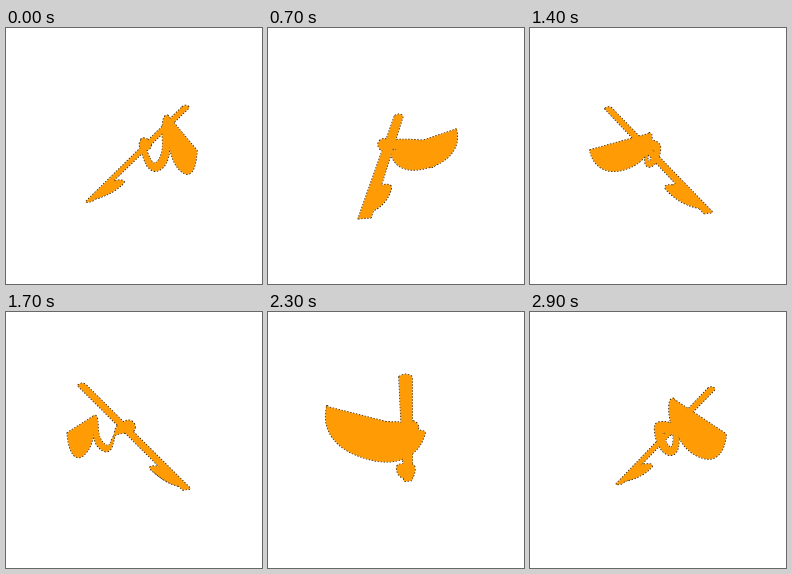
Recreate the animation shown at these times as an HTML page with a canvas. Size 256 by 256 pixels, loop 3000 ms.

```html
<!DOCTYPE html>
<html>
<head>
<meta charset="utf-8">
<style>
  html, body { margin: 0; width: 100%; height: 100%; overflow: hidden; background: #fff; }
  canvas { display: block; width: 256px; height: 256px; }
</style>
</head>
<body>
<canvas id="stage" width="256" height="256"></canvas>
<script>
const ctx = document.getElementById('stage').getContext('2d');
const STEPS = 30, STEP_MS = 100, DIST = 230, MID = 128;
const ORANGE = '#ff9b05';

// Points are [x, height, depth]; the model spins about the vertical axis.
const tip = [52, -49, 2], foot = [-49, 49, 20];
const mix = (a, b, k) => a.map((v, i) => v + (b[i] - v) * k);
const rod = h => mix(tip, foot, (h + 49) / 98);
const beside = (h, r, deg) => {
  const a = deg * Math.PI / 180, p = rod(h);
  return [p[0] + r * Math.cos(a), h, p[2] + r * Math.sin(a)];
};

// Rounded half disc hanging at right angles to the chord a-b
function bowl(a, b, depth) {
  const m = mix(a, b, 0.5), u = a.map((v, i) => v - m[i]);
  const lean = -u[1] * depth / (u[0] ** 2 + u[2] ** 2);
  const down = [u[0] * lean, depth, u[2] * lean];
  const full = v => Math.sign(v) * Math.abs(v) ** 0.88;
  return Array.from({ length: 33 }, (_, i) => {
    const t = Math.PI * i / 32, c = full(Math.cos(t)), s = full(Math.sin(t));
    return m.map((v, j) => v + u[j] * c + down[j] * s);
  });
}

const hornA = [25.1, -28.5, -62.5], hornB = [66.5, -5.8, 14.1];
const blade = bowl(hornA, hornB, 31);

// Ribbon from the rod, round below, and up to the blade
const hook = [
  [12, -17, 8], [9, -17, -15], [5.5, -14, -40], [6.5, -3, -41], [9, 4, -40],
  [12, 10, -36], [18, 13.5, -34], [24, 10, -40], [27, 2, -50], [27, -14, -60],
  [26, -30, -63], [21.5, -29, -62], [21, -18, -60], [23, -5, -50], [21, 4, -38],
  [18, 7, -31], [15, 5, -30], [13, 1, -32], [10, -6, -30], [9, -7, -15], [12, -7, 8]
];
const knob = [12, -12, 14];
const bit = deg => [
  rod(27), beside(26, 18, deg), beside(35, 18, deg), beside(43, 13, deg), rod(47), rod(38)
];
const curved = [hook, bit(-50), bit(15)];

function project([x, y, z], a) {
  const c = Math.cos(a), s = Math.sin(a);
  const k = DIST / (DIST + x * s + z * c);
  return [MID + (x * c - z * s) * k, MID + y * k, k];
}

function polygon(path, pts) {
  pts.forEach(([x, y], i) => i ? path.lineTo(x, y) : path.moveTo(x, y));
  path.closePath();
}

function smooth(path, pts) {
  const n = pts.length;
  const half = i => mix(pts[i % n], pts[(i + 1) % n], 0.5);
  path.moveTo(...half(n - 1).slice(0, 2));
  for (let i = 0; i < n; i++) {
    const h = half(i);
    path.quadraticCurveTo(pts[i][0], pts[i][1], h[0], h[1]);
  }
  path.closePath();
}

function shapes(a) {
  const list = [];
  const add = build => { const p = new Path2D(); build(p); list.push(p); };
  const view = pts => pts.map(p => project(p, a));

  add(p => polygon(p, view(blade)));
  curved.forEach(pts => add(p => smooth(p, view(pts))));

  const [kx, ky, ks] = project(knob, a);
  add(p => p.arc(kx, ky, 6 * ks, 0, 7));

  const [t, f] = view([tip, foot]);
  const w = Math.hypot(3.5 * Math.cos(a), 4.9 * Math.sin(a));
  add(p => {
    p.moveTo(t[0] - w * t[2], t[1]);
    p.quadraticCurveTo(t[0], t[1] - 3.5 * t[2], t[0] + w * t[2], t[1]);
    p.lineTo(f[0] + w * f[2], f[1]);
    p.lineTo(f[0] - w * f[2], f[1] + 1);
    p.closePath();
  });
  return list;
}

function draw(a) {
  ctx.fillStyle = '#fff';
  ctx.fillRect(0, 0, 256, 256);
  const list = shapes(a);
  ctx.lineJoin = 'round';
  ctx.strokeStyle = '#2a1a00';
  ctx.lineWidth = 2;
  ctx.setLineDash([1.5, 1.5]);
  list.forEach(p => ctx.stroke(p));
  ctx.setLineDash([]);
  ctx.fillStyle = ctx.strokeStyle = ORANGE;
  ctx.lineWidth = 0.7;
  list.forEach(p => { ctx.fill(p); ctx.stroke(p); });
}

let last = -1;
function tick() {
  const step = Math.floor(performance.now() / STEP_MS) % STEPS;
  if (step !== last) draw(2 * Math.PI * (last = step) / STEPS);
  requestAnimationFrame(tick);
}
tick();
</script>
</body>
</html>
```
